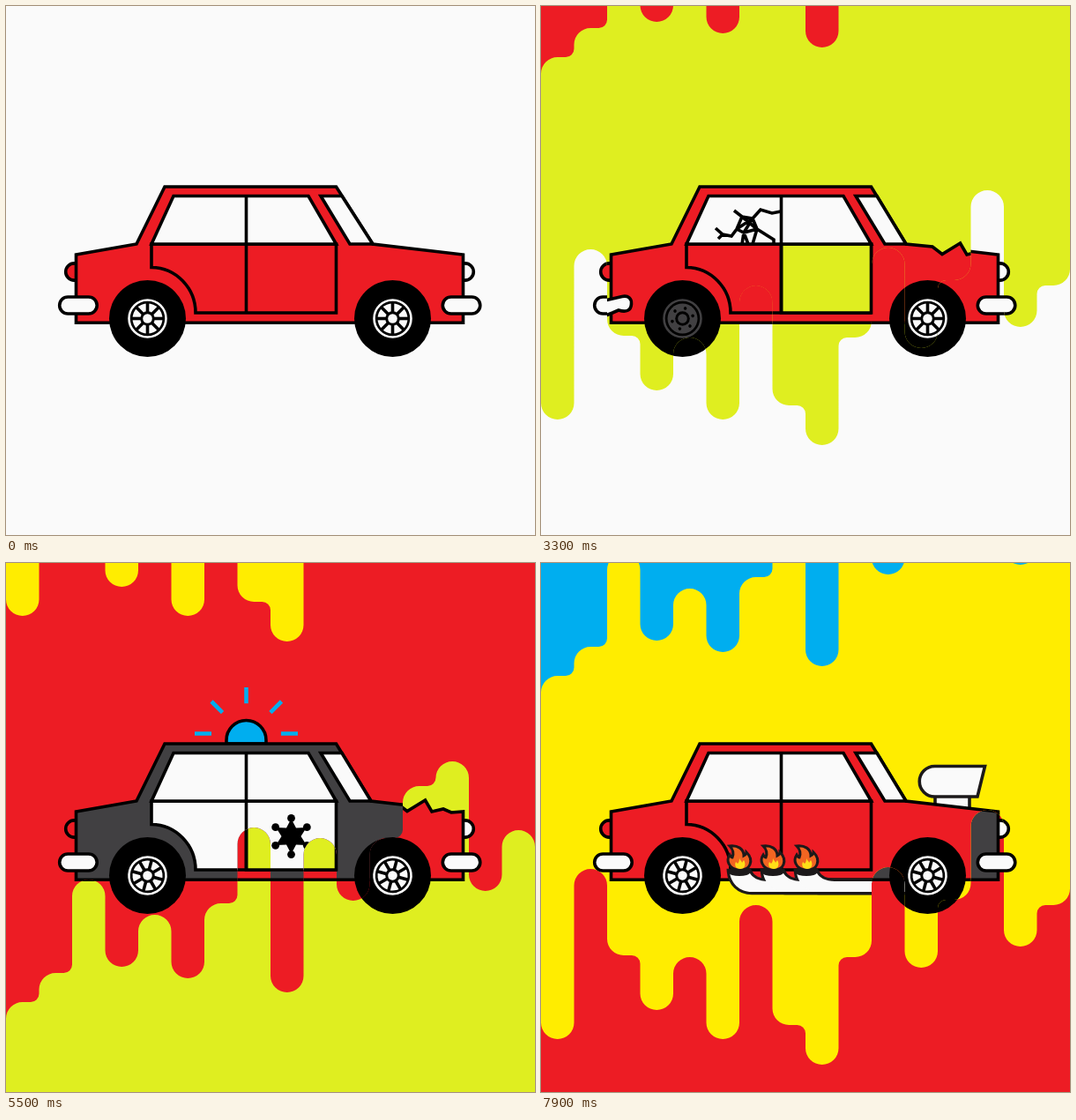
An HTML page with a canvas for the animation above (8000 ms loop, 600 px wide and 600 px high).

```html
<!DOCTYPE html>
<html lang="en">
<head>
<meta charset="utf-8">
<title>Paint drip car</title>
<style>
html, body { margin: 0; width: 100%; height: 100%; overflow: hidden; background: #fafafa; }
canvas { display: block; width: 600px; height: 600px; }
</style>
</head>
<body>
<canvas id="stage" width="600" height="600"></canvas>
<script>
const ctx = document.getElementById('stage').getContext('2d');
const WHITE = '#fafafa', RED = '#ed1c24', LIME = '#dfee20', YELLOW = '#ffed00',
      BLUE = '#00aeef', GRAY = '#414042', BLACK = '#000', INK = '#1c191a';
const LOOP = 8000, STEP = 100, SPEED = 0.2, COL = 37.5, FAR = 5000;

// Lower edge of each paint column; "fat" edges round outward corners more.
const fat = { edge: -FAR, outward: true, heights:
  [-191, -384, -286, -224, -284, -191, -343, -207, -162, -284, -386, -272, -349, -451, -296, -343] };
const thin = { edge: FAR, outward: false, heights:
  [198, 165, 59, 158, 99, 171, 86, 0, 187, 12, 83, 12, -47, -75, 72, 3] };

const layers = [
  { color: LIME, drip: fat, lag: 0, car: 'wreck' },
  { color: RED, drip: thin, lag: 800, car: 'police' },
  { color: YELLOW, drip: fat, lag: 849, car: 'hotrod' },
  { color: BLUE, drip: thin, lag: 1650 }
];

function shape(d, fill, stroke = BLACK, width = 3.6) {
  const p = new Path2D(d);
  if (fill) { ctx.fillStyle = fill; ctx.fill(p); }
  if (stroke) { ctx.strokeStyle = stroke; ctx.lineWidth = width; ctx.stroke(p); }
}

function disc(x, y, r, fill, stroke, width) {
  ctx.beginPath();
  ctx.arc(x, y, r, 0, Math.PI * 2);
  if (fill) { ctx.fillStyle = fill; ctx.fill(); }
  if (stroke) { ctx.strokeStyle = stroke; ctx.lineWidth = width; ctx.stroke(); }
}

function around(count, radius, draw) {
  for (let i = 0; i < count; i++) {
    const a = i / count * Math.PI * 2 - Math.PI / 2;
    draw(Math.cos(a) * radius, Math.sin(a) * radius);
  }
}

function wheel(x, t, worn) {
  ctx.save();
  ctx.translate(x, 354.5);
  disc(0, 0, 43.5, BLACK);
  ctx.rotate(t * 0.15 * Math.PI / 180);
  const tone = worn ? GRAY : WHITE;
  disc(0, 0, 21, null, tone, 2.6);
  disc(0, 0, 17, tone);
  if (worn) around(6, 12, (px, py) => disc(px, py, 1.8, BLACK));
  else around(8, 18, (px, py) => shape(`M0 0L${px} ${py}`, null, BLACK, 3.6));
  disc(0, 0, 8.3, BLACK);
  disc(0, 0, 5.3, tone);
  ctx.restore();
}

function bumper(x) {
  shape(`M${x + 9.5} 330h23.5a9.5 9.5 0 0 1 0 19h-23.5a9.5 9.5 0 0 1 0 -19Z`, WHITE);
}

function siren(t) {
  const left = 1 - (t / STEP % 3) * 0.32;
  const ray = (x, y, dx, dy) =>
    shape(`M${x} ${y}l${dx * left} ${dy * left}`, null, BLUE, 4.6);
  ray(214, 193.5, 28, 0);
  ray(331, 193.5, -28, 0);
  ray(233, 157, 18.5, 18.5);
  ray(312.5, 157, -18.5, 18.5);
  ray(272.5, 141, 0, 27);
  shape('M250 205V201a22.5 22.5 0 0 1 45 0V205Z', BLUE);
}

function badge() {
  ctx.save();
  ctx.translate(323.5, 310);
  ctx.beginPath();
  for (let i = 0; i < 12; i++) {
    const a = i * Math.PI / 6, r = i % 2 ? 11 : 20;
    ctx.lineTo(Math.sin(a) * r, -Math.cos(a) * r);
  }
  ctx.fillStyle = BLACK;
  ctx.fill();
  around(6, 20.6, (x, y) => disc(x, y, 4.4, BLACK));
  ctx.restore();
}

function cracks() {
  shape('M219 232L228 239L240 241L249 231L262 235L272 233' +
    'M198 252L206 259L216 261L222 253L228 239M201 264L206 259' +
    'M222 253L240 241L245 253L264 265V270M222 253L230 257L245 253' +
    'M228 239L245 253M240 241L230 257L235 270M245 253L240 270M230 257L228 270', null);
}

function engine() {
  shape('M447 262H486V280H447Z', WHITE, INK);
  shape('M446.5 230.5H503.5L495 265H446.5a17.2 17.2 0 0 1 0 -34.5Z', WHITE, INK);
}

function exhaust() {
  const xs = [225, 263, 301];
  const pipe = x => `M${x - 11} 350C${x - 10} 363 ${x} 373 ${x + 14} 373H420V361H${x + 32}` +
    `C${x + 22} 361 ${x + 14} 357 ${x + 11} 350Z`;
  xs.forEach(x => shape(pipe(x), null, INK, 6.5));
  xs.forEach(x => shape(pipe(x), WHITE, null));
  xs.forEach(x => {
    shape(`M${x - 11} 350a11 3.5 0 0 1 22 0a11 3.5 0 0 1 -22 0Z`, INK, INK, 3);
    ctx.save();
    ctx.translate(x, 348);
    shape('M-11 -27C-2 -28 5 -24 5 -16C7 -17 8 -18 8 -20C12 -16 14 -11 12 -6C10 -1 5 0 1 0' +
      'C-5 0 -10 -2 -12 -7C-14 -11 -13 -14 -11 -17C-10 -15 -9 -14 -8 -14C-6 -19 -7 -23 -11 -27Z',
      '#f26522', INK, 3);
    shape('M0 -14C0 -11 3 -10 3 -8L5 -11C8 -6 6 -1 1 -1C-4 -1 -6 -5 -4 -9L-2 -7C0 -9 0 -11 0 -14Z',
      '#ffde17', null);
    ctx.restore();
  });
}

function drawCar(kind, t) {
  const wreck = kind === 'wreck', police = kind === 'police', hotrod = kind === 'hotrod';
  const paint = police ? GRAY : RED;
  const corner = kind ? 414 : 416;
  const hood = wreck ? 'L444 273L455 281.5L475.5 269L483 282L496 279L505 283L518.5 282' : 'L518.5 282';

  if (police) siren(t);
  if (hotrod) engine();
  disc(77.3, 301.5, 9.6, RED, BLACK, 3.6);
  disc(520.7, 301.5, 9.6, WHITE, BLACK, 3.6);
  shape(`M79.5 282L148 270L180 205H374.5L${corner} 270${hood}V359.3H79.5Z`, paint);
  shape('M165 270V296.5A50.5 51.5 0 0 1 215 348H374.5V270Z', police ? WHITE : paint);
  if (wreck) shape('M272.5 270H374.5V348H272.5Z', LIME);
  shape('M165 270L190 215.5H343L374.5 270Z', WHITE);
  if (wreck) cracks();
  shape('M272.5 215.5V348', null);
  shape(`M357 215.5H381L${corner} 270H390Z`, WHITE);
  if (police) badge();
  if (hotrod) exhaust();

  wheel(160.5, t, wreck);
  wheel(438.5, t);
  if (wreck) {
    shape('M60.5 344C61 339 63 336 68 335L92 329.5C99 328 103 332 102.500 338C102 345 97 348 88 345' +
      'L81 348L71 352L69 346Z', WHITE);
  } else bumper(60.7);
  bumper(495.3);
}

function dripPath({ edge, outward, heights }, shift) {
  const big = COL / 2, small = 9.5;
  const at = i => i in heights ? heights[i] + shift : edge;
  ctx.beginPath();
  ctx.moveTo(0, edge);
  heights.forEach((_, i) => {
    const y = at(i), before = at(i - 1), after = at(i + 1), x = i * COL;
    const isStep = (y > before) !== (y > after);
    const radius = next => isStep && (y > next) !== outward ? small : big;
    ctx.arcTo(x, y, x + big, y, radius(before));
    ctx.arcTo(x + COL, y, x + COL, after, radius(after));
  });
  ctx.lineTo(600, edge);
  ctx.lineTo(700, edge);
  ctx.lineTo(700, -FAR);
  ctx.lineTo(-100, -FAR);
  ctx.lineTo(-100, edge);
  ctx.closePath();
}

function render(t) {
  ctx.fillStyle = WHITE;
  ctx.fillRect(0, 0, 600, 600);
  drawCar('', t);
  for (const { color, drip, lag, car } of layers) {
    ctx.save();
    dripPath(drip, t * SPEED - lag);
    ctx.clip();
    ctx.fillStyle = color;
    ctx.fillRect(0, 0, 600, 600);
    if (car) drawCar(car, t);
    ctx.restore();
  }
}

const start = performance.now();
function tick() {
  const elapsed = performance.now() - start;
  render(Math.floor((elapsed + 8) / STEP) * STEP % LOOP);
  requestAnimationFrame(tick);
}
tick();
</script>
</body>
</html>
```
